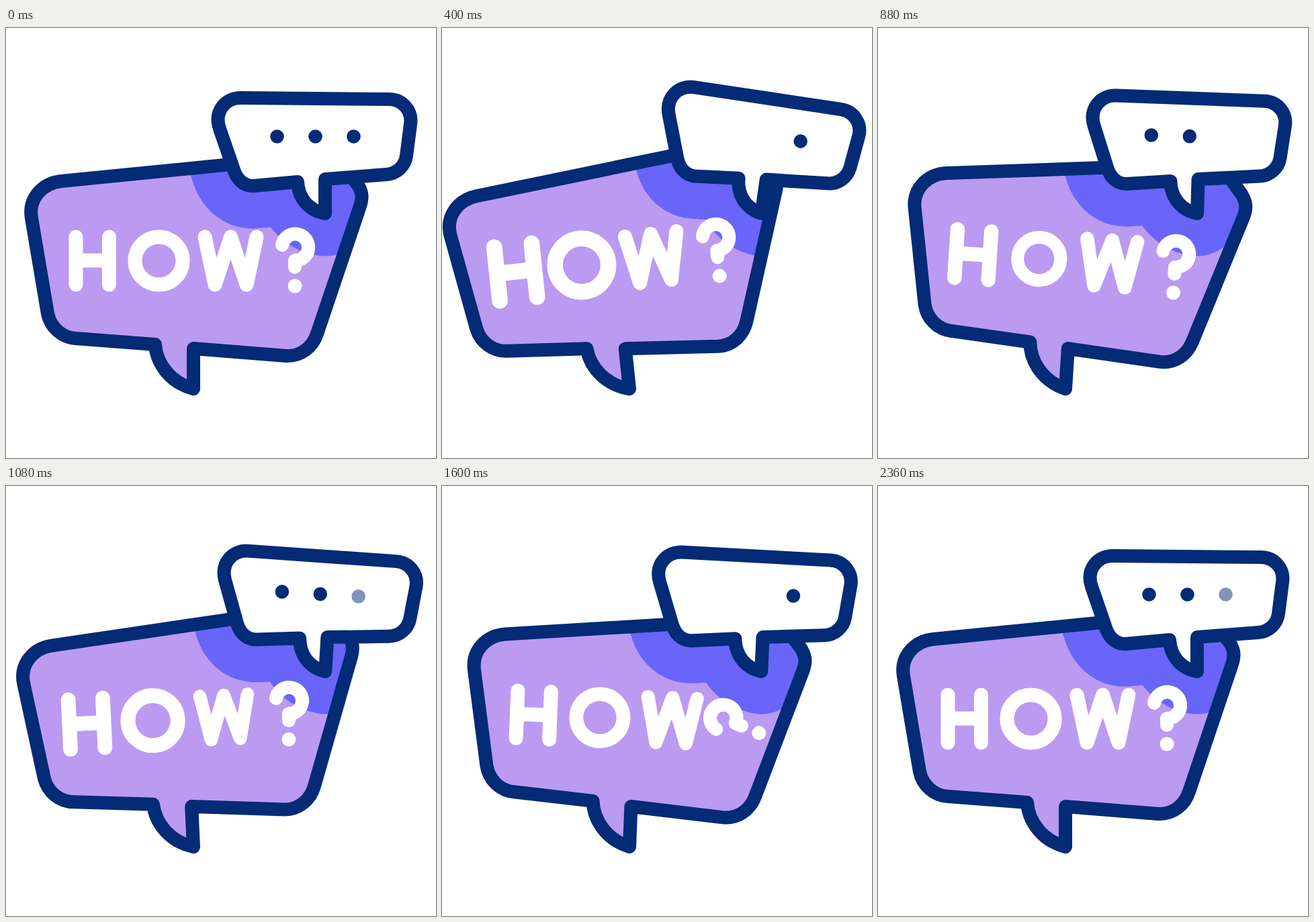
An HTML page that plays this animation: 640 px wide and 640 px high, repeating every 2.4 s.

```html
<!DOCTYPE html>
<html lang="en">
<head>
<meta charset="utf-8">
<title>How?</title>
<style>
  html, body { margin: 0; width: 100%; height: 100%; overflow: hidden; background: #fff; }
  svg { display: block; width: 100%; height: 100%; }
  path, circle { stroke-linecap: round; stroke-linejoin: round; }
  .line { fill: none; stroke: #032b76; stroke-width: 20; }
  .letters { fill: none; stroke: #fff; stroke-width: 21; }
</style>
</head>
<body>
<svg viewBox="0 0 640 640" role="img" aria-label="HOW?">
  <defs>
    <path id="big" d="M279 537V477L417 488C438 489 456 476 463 455L527 265C532 250 529 241 522 231L502 207
      C490 192 475 190 455 191L82 228C54 231 33 254 38 283L62 425C66 445 83 461 104 462L222 471
      C224 500 245 528 279 537Z"/>
    <path id="small" d="M475 276V225L566 218C582 217 594 205 596 190L602 143C605 123 590 106 570 106L349 104
      C327 104 309 124 318 150L338 208C343 225 353 235 368 235L434 229C435 252 450 272 475 276Z"/>
    <clipPath id="inside"><use class="swing" href="#big"/></clipPath>
  </defs>

  <use class="swing" href="#big" fill="#bb9af2"/>
  <g clip-path="url(#inside)">
    <use class="sway" href="#small" fill="#6865f8" stroke="#6865f8" stroke-width="127"/>
  </g>

  <g class="swing">
    <use href="#big" class="line"/>
    <g class="letters">
      <path class="pop" d="M104 311V382M153.5 311V382M104 346H153.5"/>
      <circle class="pop" cx="227.5" cy="346.5" r="35.5"/>
      <path class="pop" d="M296 311L311 382L334.5 311L358 382L373 311"/>
      <g id="mark">
        <path d="M411 323A19.7 19.7 0 1 1 430 346V356" stroke-width="20"/>
        <circle cx="430" cy="384" r="10.5" fill="#fff" stroke="none"/>
      </g>
    </g>
  </g>

  <g class="sway">
    <use href="#small" fill="#fff"/>
    <use href="#small" class="line"/>
    <g fill="#032b76">
      <circle class="dot" cx="403.5" cy="161.5" r="10.3"/>
      <circle class="dot" cx="460.5" cy="161.5" r="10.3"/>
      <circle class="dot" cx="517.5" cy="161.5" r="10.3"/>
    </g>
  </g>
</svg>
<script>
  const LOOP = 2400, STEP = 40, DOT_CYCLE = 1280;
  const all = s => [...document.querySelectorAll(s)];
  const swing = all('.swing'), sway = all('.sway'), pops = all('.pop'), dots = all('.dot');
  const mark = document.getElementById('mark');
  const popX = [128.5, 227.5, 334.5];

  // Keys are [time, value] pairs
  const bigKeys = [[0, 0], [400, -6], [760, 6], [1120, -3], [1480, 3], [1840, 0]];
  const smallKeys = [[0, 0], [360, 9], [670, -12], [980, 6], [1320, -6], [1640, 3], [2000, 0]];
  const popKeys = [[80, 1], [320, 1.16], [690, .9], [990, 1.07], [1260, .95], [1520, 1]];
  const markKeys = [[1040, 0], [1820, 360]];

  const clamp = x => Math.min(1, Math.max(0, x));
  const ease = x => x * x * (3 - 2 * x);

  function at(keys, t) {
    let v = keys[0][1];
    for (let i = 1; i < keys.length; i++) {
      const [t0, v0] = keys[i - 1], [t1, v1] = keys[i];
      if (t > t0) v = v0 + (v1 - v0) * ease(clamp((t - t0) / (t1 - t0)));
    }
    return v;
  }

  const turn = (el, angle, x, y) => el.setAttribute('transform', `rotate(${angle} ${x} ${y})`);

  function draw(t) {
    swing.forEach(el => turn(el, at(bigKeys, t), 279, 537));
    sway.forEach(el => turn(el, at(smallKeys, t), 475, 280));
    pops.forEach((el, i) => {
      const s = at(popKeys, t - 160 * i), x = popX[i], y = 346.5;
      el.setAttribute('transform', `translate(${x} ${y}) scale(${s}) translate(${-x} ${-y})`);
    });
    turn(mark, at(markKeys, t), 430.5, 347);
    dots.forEach((el, i) => {
      const u = t % DOT_CYCLE - 240 * i;
      el.setAttribute('opacity', 1 - clamp(u / 80) + clamp((u - 560) / 80));
    });
  }

  const start = performance.now();
  function tick() {
    const t = (performance.now() - start) % LOOP;
    draw(Math.floor(t / STEP) * STEP);
    requestAnimationFrame(tick);
  }
  tick();
</script>
</body>
</html>
```
